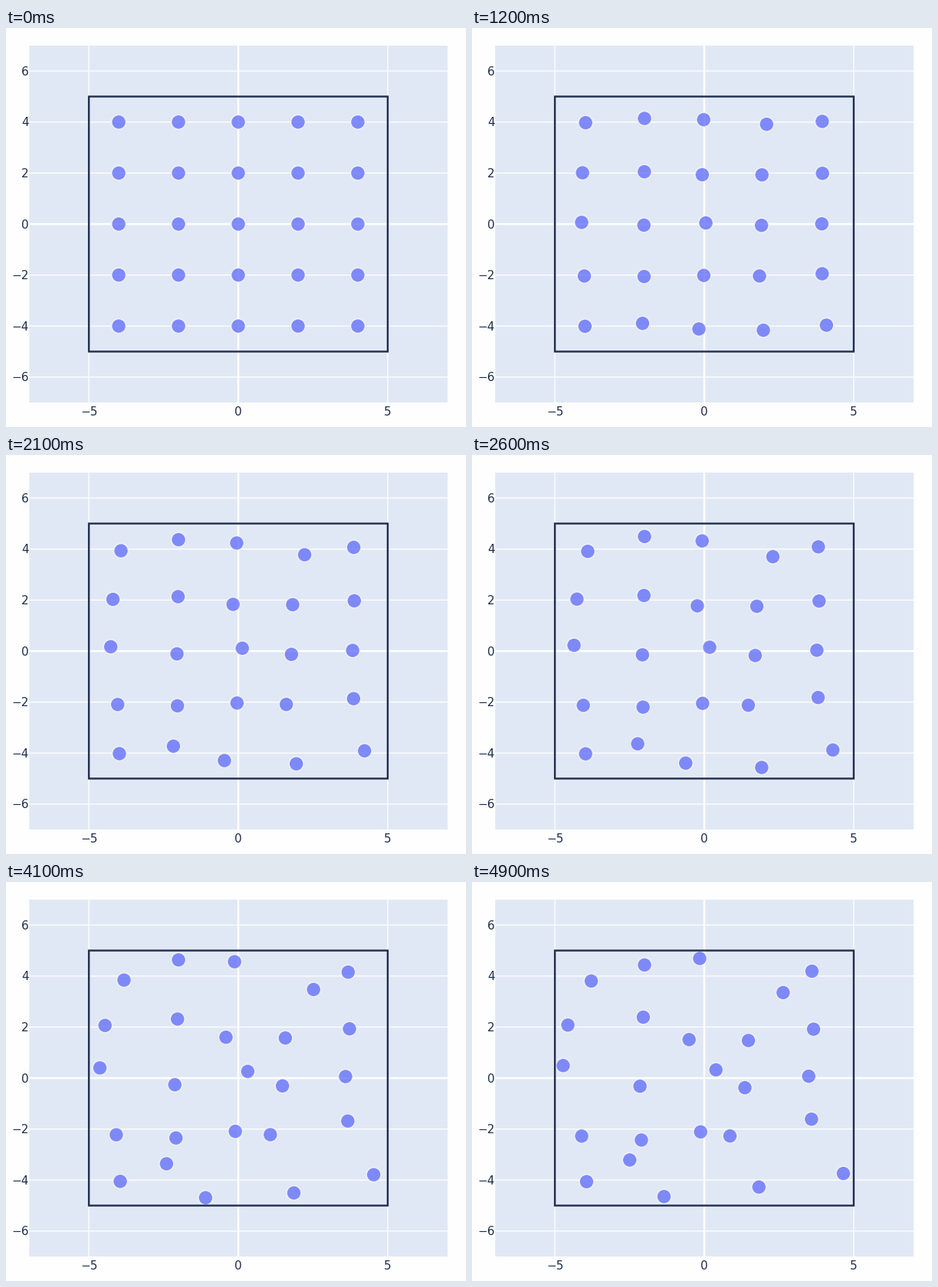
These frames come from a looping animation (600x521 px, 5000 ms). A matplotlib script:

```python
import numpy as np
import matplotlib.pyplot as plt
from matplotlib.animation import FuncAnimation
from matplotlib.patches import Circle, Rectangle

W, H, DPI = 600, 521, 64
PT = 72 / DPI                      # points per pixel
FRAMES, INTERVAL = 50, 100

X0, Y0 = 303.0, 256.0              # pixel position of the data origin
SX, SY = 38.98, 33.3               # pixels per data unit
LEFT, TOP, RIGHT, BOTTOM = 30.3, 23.0, 576.0, 489.0
WALL = 4.75                        # centres bounce here
INK, PANEL, DOT = "#1e2e4c", "#e1e8f5", "#636efa"

# Unfolded travel of each dot over the whole loop, in pixels, row by row
TRAVEL = np.array([
    (8.5, 6.5), (0, -35.5), (-6, -23), (24.9, 21.6), (-15.5, -6.3),
    (-22, -2.6), (-1.6, -12.9), (-19.8, 16.4), (-20.4, 17.6), (-13.4, 2.8),
    (-30.3, -16.3), (-5.9, 10.7), (15.2, -10.7), (-25, 12.6), (-19.7, -2.4),
    (-4, 9.2), (-4.1, 14.3), (-4.8, 3.7), (-44.5, 9), (-16.1, -12.9),
    (2.4, 2.1), (-19.3, -26.2), (-52.5, 28.4), (-6.7, 40.8), (25.5, -8.6),
])
START = np.array([(x, y) for y in (4, 2, 0, -2, -4)
                  for x in (-4, -2, 0, 2, 4)], float)
RAMP_START, RAMP = 3.0, 6.6        # soft start, in frames


def px(x):
    return X0 + SX * x


def py(y):
    return Y0 - SY * y


def elapsed(i):
    t = max(i - RAMP_START, 0)
    return t * t / (2 * RAMP) if t < RAMP else t - RAMP / 2


SPEED = TRAVEL / (SX, -SY) / elapsed(FRAMES - 1)


def bounce(p):
    """Fold free positions back between the walls."""
    q = np.mod(p + WALL, 4 * WALL)
    return np.where(q > 2 * WALL, 4 * WALL - q, q) - WALL


fig = plt.figure(figsize=(W / DPI, H / DPI), dpi=DPI, facecolor="#fefeff")
ax = fig.add_axes([0, 0, 1, 1])
ax.set_xlim(0, W)
ax.set_ylim(H, 0)
ax.axis("off")


def line(xs, ys, width):
    ax.plot(xs, ys, color="white", lw=width * PT, snap=False,
            solid_capstyle="butt", zorder=1)


def label(x, y, value, align):
    ax.text(x, y, str(value).replace("-", "\u2212"), color=INK, ha=align,
            va="baseline", family="DejaVu Sans", fontsize=15.2 * PT)


ax.add_patch(Rectangle((LEFT, TOP), RIGHT - LEFT, BOTTOM - TOP, fc=PANEL,
                       ec="none", snap=False, zorder=0))

for v in (-5, 0, 5):
    line([px(v)] * 2, [TOP, BOTTOM], 1.3 if v else 2.5)
    label(px(v), 506, v, "center")
for v in range(-6, 7, 2):
    line([LEFT, RIGHT], [py(v)] * 2, 1.3 if v else 2.5)
    label(29.4, py(v) + 5.6, v, "right")

dots = [ax.add_patch(Circle((px(x), py(y)), 9.3, fc=DOT, ec="white",
                            lw=1.3 * PT, alpha=0.78, zorder=2))
        for x, y in START]

ax.add_patch(Rectangle((px(-5), py(5)), 10 * SX, 10 * SY, fc="none", ec=INK,
                       lw=2.4 * PT, snap=False, joinstyle="miter", zorder=3))


def update(i):
    for dot, (x, y) in zip(dots, bounce(START + SPEED * elapsed(i))):
        dot.center = px(x), py(y)
    return dots


anim = FuncAnimation(fig, update, frames=FRAMES, interval=INTERVAL,
                     init_func=lambda: update(0), repeat=True, repeat_delay=0)
plt.show()
```
